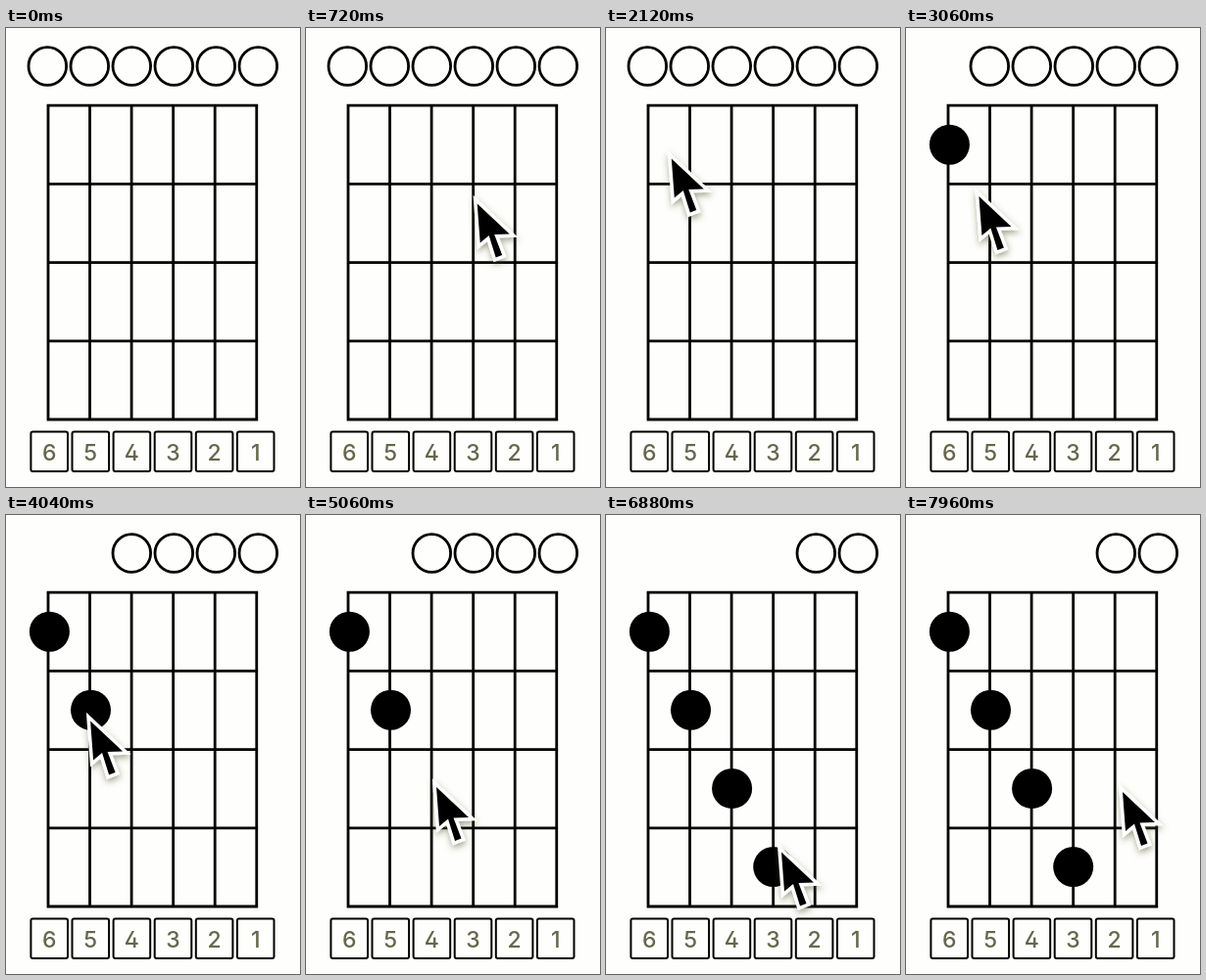
An HTML page for the animation above (8 s loop, 300x469 px).

```html
<!DOCTYPE html>
<html lang="en">
<head>
<meta charset="utf-8">
<title>Fretboard chord</title>
<style>
  html, body { margin: 0; width: 100%; height: 100%; overflow: hidden; background: #fefefc; }
  svg { display: block; }
  text {
    font: 500 23px Inter, "Noto Sans", sans-serif;
    font-feature-settings: "cv02"; /* open four */
    fill: #66664e;
    text-anchor: middle;
  }
</style>
</head>
<body>
<svg width="300" height="469" viewBox="0 0 300 469">
  <defs>
    <filter id="shade" x="-50%" y="-50%" width="200%" height="200%">
      <feDropShadow dx="0.5" dy="3" stdDeviation="3.2" flood-color="#4a4a20" flood-opacity="0.5"/>
    </filter>
  </defs>
  <g id="open" fill="none" stroke="#000" stroke-width="2.8"></g>
  <path id="grid" fill="none" stroke="#000" stroke-width="2.8"/>
  <g id="keys"></g>
  <g id="dots"></g>
  <g id="cursor">
    <path d="M0 0L3 40L12 32.5L19 55L25.5 52.5L17.5 31.5L33 31Z" fill="#000" stroke="#fff"
      stroke-width="7" paint-order="stroke" filter="url(#shade)"/>
  </g>
</svg>
<script>
const LOOP = 8000;
const STRINGS = 6;
const BEAT = 840;
const clicks = [2700, 3700, 5320, 6880];

// Each move glides on from where the last one ended
const start = { x: 312, y: 238 };
const moves = [
  { at: 0, time: 2500, x: 63, y: 132, back: -0.6 },
  { at: 2800, time: 1200, x: 85, y: 209, back: 0 },
  { at: 4035, time: 1025, x: 133, y: 278, back: 1.7 },
  { at: 5460, time: 1280, x: 179, y: 344.5, back: 1.7 },
  { at: 7140, time: 720, x: 221, y: 283, back: 1.7 }
];

const byId = id => document.getElementById(id);
const times = (n, f) => Array.from({ length: n }, (_, i) => f(i));

function add(parent, tag, attrs, text) {
  const el = document.createElementNS("http://www.w3.org/2000/svg", tag);
  for (const k in attrs) el.setAttribute(k, attrs[k]);
  if (text) el.textContent = text;
  return byId(parent).appendChild(el);
}

byId("grid").setAttribute("d",
  times(STRINGS, i => `M${43 + 42.55 * i} 77.8V401.4`).join("") +
  times(5, i => `M41.6 ${79.2 + 80.2 * i}H257.2`).join(""));

const rings = times(STRINGS, i =>
  add("open", "circle", { cx: 42.3 + 43 * i, cy: 39, r: 19.3 }));

const dots = times(clicks.length, i =>
  add("dots", "circle", { cx: 44.4 + 42.1 * i, cy: 119.2 + 80.1 * i, r: 20.5 }));

times(STRINGS, i => {
  const x = 44.2 + 42.1 * i;
  add("keys", "rect", {
    x: x - 18.8, y: 412.5, width: 37.6, height: 40.5, rx: 2,
    fill: "none", stroke: "#000", "stroke-width": 2
  });
  add("keys", "text", { x, y: 442 }, String(STRINGS - i));
});

// The pointer freezes for 100 ms twice per beat
function stutter(t) {
  const u = (t < 5460 ? t : t - BEAT / 2) % BEAT;
  for (const h of [440, 720]) if (u >= h && u < h + 100) return t - (u - h);
  return t;
}

// Ease out; a positive "back" overshoots and returns
function ease(s, back) {
  const u = 1 - Math.min(1, Math.max(0, s));
  return 1 - (back + 1) * u ** 3 + back * u * u;
}

function tip(t) {
  let { x, y } = start;
  for (const m of moves) {
    const e = ease((t - m.at) / m.time, m.back);
    x += (m.x - x) * e;
    y += (m.y - y) * e;
    if (t < m.at + m.time) break;
  }
  return { x, y };
}

function draw(t) {
  clicks.forEach((at, i) => {
    const on = t >= at;
    dots[i].setAttribute("visibility", on ? "visible" : "hidden");
    rings[i].setAttribute("visibility", on ? "hidden" : "visible");
  });
  const { x, y } = tip(stutter(t));
  byId("cursor").setAttribute("transform", `translate(${x.toFixed(2)} ${y.toFixed(2)})`);
}

let first;
function tick(now) {
  first ??= now;
  draw((now - first) % LOOP);
  requestAnimationFrame(tick);
}
draw(0);
requestAnimationFrame(tick);
</script>
</body>
</html>
```
